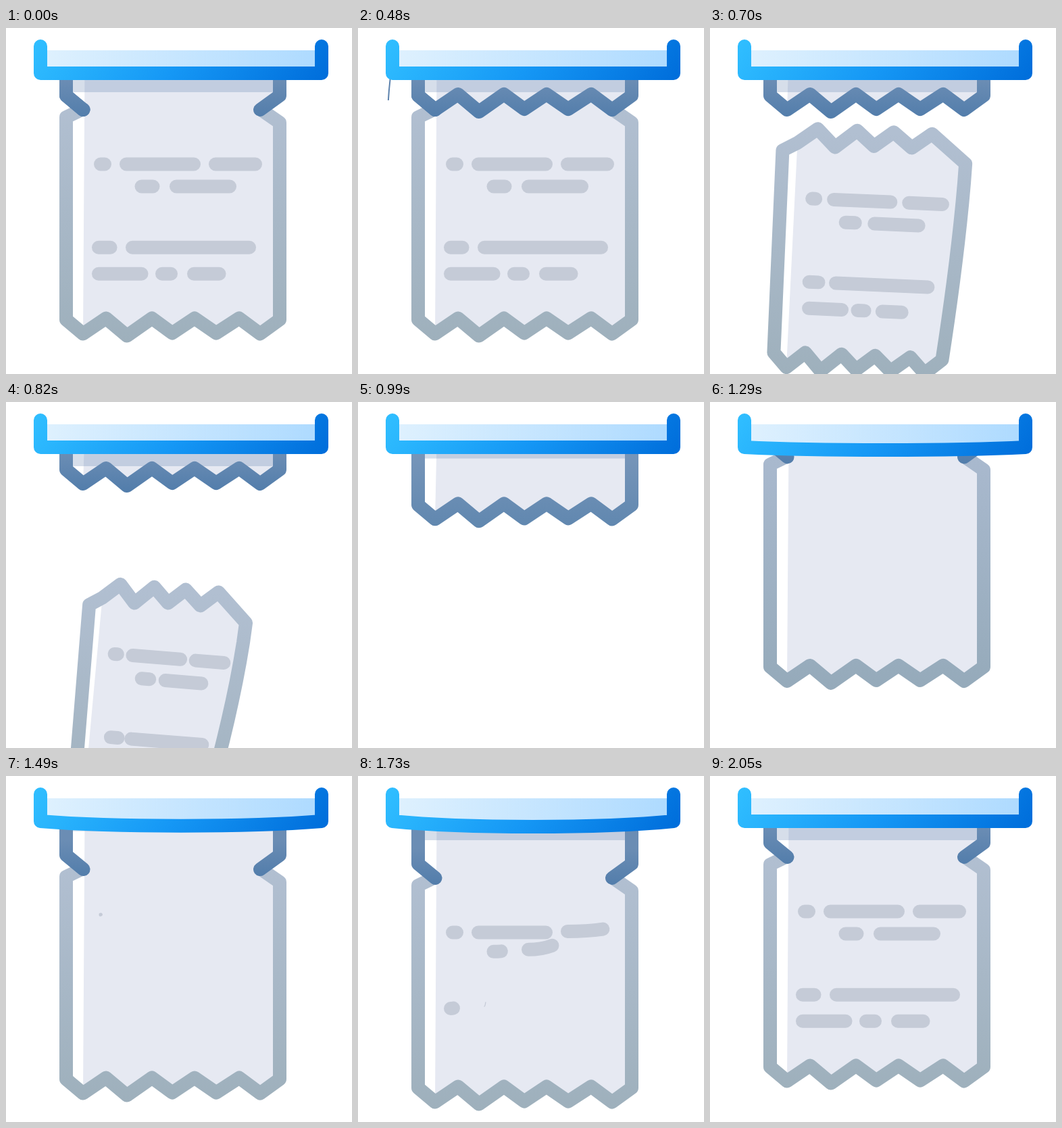
Write an HTML page with a canvas that moves like this. It is 512 by 512 pixels and loops after 2.2 s.

```html
<!DOCTYPE html>
<html lang="en">
<head>
<meta charset="utf-8">
<title>Receipt printer</title>
<style>
html, body { margin: 0; width: 100%; height: 100%; overflow: hidden; background: #fff; }
canvas { display: block; width: 100vmin; height: 100vmin; }
</style>
</head>
<body>
<canvas id="stage" width="512" height="512"></canvas>
<script>
const ctx = document.getElementById('stage').getContext('2d');
const LOOP = 2200, TORN = 540, FEED = 950, DROP = 331.5;
const PAPER = '#e6e9f2', INK = '#c5cbd7', WIDTH = 20;

// Torn edge of the stub; the lower edge of the slip is the same, moved down.
const ZIG = [[89, 100], [114, 121], [148, 98], [179, 124], [216, 98], [246, 120],
  [279, 98], [311, 120], [345, 98], [376, 121], [405, 100]];
const BOTTOM = ZIG.map(([x, y]) => [x, y + DROP]);
const TOP = [[89, 132], [114, 120], ...ZIG.slice(2, 9), [405, 140]];

// Rows of dashes: y, then start and end of each dash.
const ROWS = [
  [201.5, [140, 146], [178, 278], [310, 369]],
  [234.5, [200.5, 217.5], [252, 331]],
  [324.8, [137, 154.5], [187, 360]],
  [363.8, [137, 200.5], [231, 244], [278, 315.5]]
];
const DASHES = ROWS.flatMap(([y, ...parts]) => parts.map(([a, b]) => ({ y, a, b })));

const clamp = v => Math.max(0, Math.min(1, v));
const span = (t, a, b) => clamp((t - a) / (b - a));
const mix = (a, b, k) => a + (b - a) * k;
const smooth = k => (1 - Math.cos(Math.PI * k)) / 2;
const outCubic = k => 1 - (1 - k) ** 3;
const rgb = (a, b, k) => `rgb(${a.map((v, i) => Math.round(mix(v, b[i], k)))})`;

function track(t, keys) {
  const i = keys.findIndex(k => k[0] > t);
  if (i < 0) return keys[keys.length - 1][1];
  if (i === 0) return keys[0][1];
  const [a, b] = [keys[i - 1], keys[i]];
  return mix(a[1], b[1], span(t, a[0], b[0]));
}

function trace(points, close) {
  ctx.beginPath();
  points.forEach(([x, y]) => ctx.lineTo(x, y));
  if (close) ctx.closePath();
}

function fill(points, style) {
  trace(points, true);
  ctx.fillStyle = style;
  ctx.fill();
}

function stroke(points, style, cap = 'round', close = false, width = WIDTH) {
  trace(points, close);
  ctx.lineCap = cap;
  ctx.lineJoin = 'round';
  ctx.lineWidth = width;
  ctx.strokeStyle = style;
  ctx.stroke();
}

function gradient(x0, y0, x1, y1, ...colors) {
  const g = ctx.createLinearGradient(x0, y0, x1, y1);
  colors.forEach((c, i) => g.addColorStop(i / (colors.length - 1), c));
  return g;
}

function paperInk(top, bottom, k) {
  return gradient(0, top, 0, bottom,
    rgb([107, 141, 180], [177, 191, 209], k),
    rgb([84, 127, 172], [158, 176, 188], k));
}

const stubInk = () => gradient(0, 77, 0, 132, '#6b8db4', '#527dab');

// Dashes grow from the left, settling down from above.
function drawDashes(t) {
  DASHES.forEach(({ y, a, b }, i) => {
    const start = 1483 + i * 41;
    const e = span(t, start, start + 187);
    if (e <= 0) return;
    const len = (b - a) * e;
    const lift = 6 * Math.min(1, (1 - e) * 5) * Math.min(1, ((b - a) / 58) ** 2);
    const y0 = y - 14 * (1 - e);
    ctx.beginPath();
    ctx.moveTo(a, y0);
    ctx.quadraticCurveTo(a + len * 0.55, y0, a + len, y0 - lift);
    ctx.lineCap = 'round';
    ctx.lineWidth = WIDTH * Math.min(1, e * 6);
    ctx.strokeStyle = INK;
    ctx.stroke();
  });
}

function drawShade(bottom) {
  if (bottom <= 70) return;
  ctx.fillStyle = 'rgba(52,93,150,.2)';
  ctx.fillRect(99, 60, 296, bottom - 60);
}

// The whole slip hanging from the printer, moved by dy.
function drawSlip(dy, dashTime, shade) {
  ctx.save();
  ctx.translate(0, dy);
  fill([[116.5, 60 - dy], [405, 60 - dy], [405, 100], [376, 121], [405, 140],
    ...BOTTOM.slice(1).reverse()], PAPER);
  const k = clamp(1 + dy / DROP);
  stroke([[118, 118], [89, 132], ...BOTTOM, [405, 140], [376, 120]],
    paperInk(Math.max(80 - dy, 120), 466, k), 'butt');
  drawDashes(dashTime);
  ctx.restore();
  drawShade(shade);
}

function drawChevrons(dy) {
  ctx.save();
  ctx.translate(0, dy);
  const ink = stubInk();
  stroke([[89, 50 - dy], [89, 100], [114.5, 121]], ink);
  stroke([[405, 50 - dy], [405, 100], [376, 121]], ink);
  ctx.restore();
}

function drawTear(t) {
  const run = ZIG.slice(1, 10);
  const lens = run.slice(1).map(([x, y], i) => Math.hypot(x - run[i][0], y - run[i][1]));
  let left = lens.reduce((a, b) => a + b) * span(t, 0, 465);
  const path = [run[0]];
  for (let i = 0; i < lens.length && left > 0; i++) {
    const k = Math.min(1, left / lens[i]);
    path.push([mix(run[i][0], run[i + 1][0], k), mix(run[i][1], run[i + 1][1], k)]);
    left -= lens[i];
  }
  stroke([[89, 50], [89, 100], ...path], stubInk());
}

function drawSliver(t) {
  if (t < 440 || t > 580) return;
  const grow = span(t, 440, 475);
  const swing = span(t, 480, 560) * 12;
  stroke([[48, 72], [46 - swing / 2, mix(74, 92, grow)], [45 - swing, mix(76, 107, grow)]],
    '#5c82ad', 'butt', false, 2);
}

function drawStub() {
  fill([[116, 60], [405, 60], ...ZIG.slice(1).reverse()], PAPER);
  drawShade(95);
  stroke([[89, 50], ...ZIG, [405, 50]], stubInk());
}

// The torn piece narrows and turns while it drops; lines keep their weight.
function drawFalling(t) {
  const p = (t - 560) / 510;
  if (p > 1) return;
  const q = Math.max(0, p) / 0.51;
  const place = ([x, y]) => {
    const bow = 0.26 + 0.07 * Math.max(0, (y - 130) / 200) ** 1.5;
    return [(x - 89) * (1 - bow * q), y];
  };
  const placeDash = (x, y) => {
    const squeeze = 0.29 + 0.1 * (y - 201) / 124;
    return [(x - 89) * (1 - squeeze * q) + 0.09 * (y - 123) * q, y];
  };
  const side = (x, y0, y1) => Array.from({ length: 11 }, (_, i) => [x, mix(y0, y1, i / 10)]);
  const right = side(405, 140, BOTTOM[10][1]);
  const base = [...BOTTOM].reverse();

  ctx.save();
  ctx.translate(89 + 34 * q, 132 + 167 * q * q);
  ctx.rotate(4.6 * q * Math.PI / 180);
  ctx.translate(0, -132);
  fill([...TOP.slice(1), ...right, ...base.slice(0, -1)].map(place), PAPER);
  stroke([...TOP, ...right, ...base].map(place), paperInk(100, 466, 1), 'round', true);
  DASHES.forEach(({ y, a, b }) => stroke([placeDash(a, y), placeDash(b, y)], INK));
  ctx.restore();
}

function drawTray(sag) {
  const c = 67 + sag * 4 / 3;
  ctx.fillStyle = gradient(51, 0, 467, 0, '#dff1fe', '#addaff');
  ctx.fillRect(51, 33, 416, 34);
  const path = new Path2D(`M51 27V67C160 ${c} 358 ${c} 467 67V27`);
  if (sag > 0) {
    ctx.save();
    ctx.clip(new Path2D('M0 60H512V120H0Z'));
    ctx.fill(path);
    ctx.restore();
  }
  ctx.lineCap = ctx.lineJoin = 'round';
  ctx.lineWidth = WIDTH;
  ctx.strokeStyle = gradient(110, -60, 408, 160, '#2fbdff', '#1597f5', '#006edb');
  ctx.stroke(path);
}

const SAG = [[1040, 0], [1130, 1.3], [1290, 4], [1500, 6.8], [1640, 7.8], [1730, 8],
  [1800, 7], [1900, 3.6], [1980, 1], [2040, 0]];
const SHADE = [[FEED, 95], [1040, 70], [1350, 70], [1650, 95]];

function slipOffset(t) {
  if (t < 1757) return mix(-DROP, 30, outCubic(span(t, FEED, 1757)));
  return mix(30, -1, smooth(span(t, 1757, 2050)));
}

function draw(t) {
  ctx.clearRect(0, 0, 512, 512);
  ctx.save();
  ctx.beginPath();
  ctx.rect(0, 62, 512, 450);
  ctx.clip();
  if (t < TORN) {
    drawSlip(0, LOOP, 95);
    drawChevrons(0);
    drawTear(t);
    drawSliver(t);
  } else if (t < FEED) {
    drawFalling(t);
    drawStub();
    drawSliver(t);
  } else {
    const dy = slipOffset(t);
    drawFalling(t);
    drawSlip(dy, t, track(t, SHADE));
    drawChevrons(dy);
  }
  ctx.restore();
  drawTray(track(t, SAG));
}

const begin = performance.now();
function tick() {
  draw((performance.now() - begin) % LOOP);
  requestAnimationFrame(tick);
}
tick();
</script>
</body>
</html>
```
